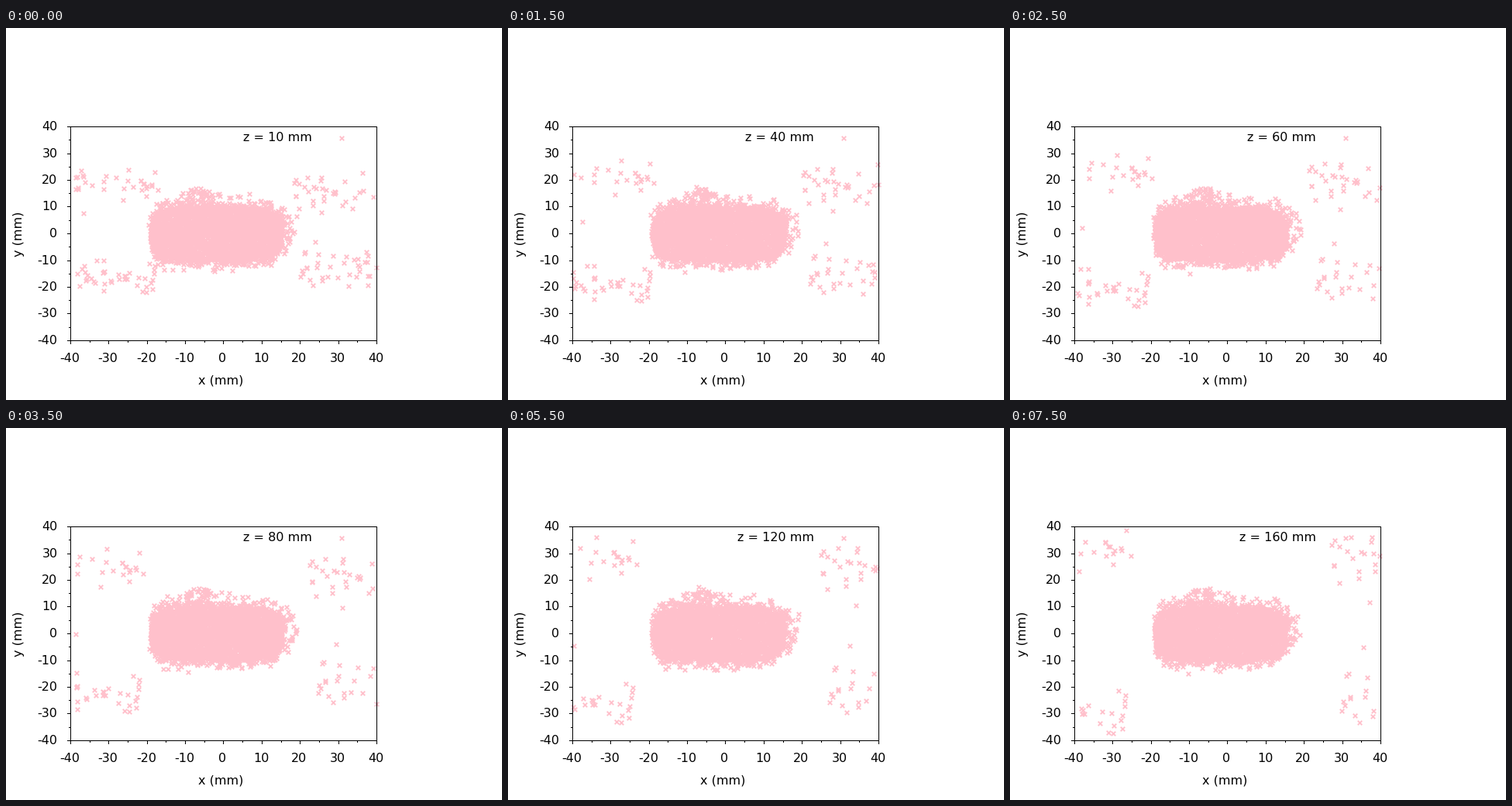
These frames come from a looping animation (640x480 px, 8000 ms). A matplotlib script:

```python
import numpy as np
import matplotlib.pyplot as plt
from matplotlib.animation import FuncAnimation

W, H, DPI = 640, 480, 100
PX = 72 / DPI
LEFT, RIGHT, TOP, BOTTOM = 83, 478, 127, 403
SX, SY = (RIGHT - LEFT) / 80, (BOTTOM - TOP) / 80
PINK = "#ffc0cb"
FRAMES, STEP = 16, 500

plt.rcParams["font.family"] = "DejaVu Sans"
plt.rcParams["font.size"] = 16 * PX

fig = plt.figure(figsize=(W / DPI, H / DPI), dpi=DPI, facecolor="white")
ax = fig.add_axes([0, 0, 1, 1])
ax.set_xlim(0, W)
ax.set_ylim(H, 0)
ax.axis("off")


def line(xs, ys):
    ax.plot(xs, ys, color="black", lw=PX, zorder=5, solid_capstyle="projecting")


def label(x, y, text, ha="center", **kw):
    return ax.text(x, y, text, ha=ha, va="baseline", zorder=6, **kw)


def crosses(x, y):
    return ax.scatter(x, y, marker="x", color=PINK, s=(5.5 * PX) ** 2,
                      linewidths=1.9 * PX, zorder=2)


def to_px(mm):
    return mm * (SX, -SY) + ((LEFT + RIGHT + 1) / 2, (TOP + BOTTOM + 1) / 2)


def draw_frame():
    line([LEFT, RIGHT, RIGHT, LEFT, LEFT], [TOP, TOP, BOTTOM, BOTTOM, TOP])
    for v in range(-40, 41, 5):
        x = round(LEFT + (v + 40) * SX)
        y = round(BOTTOM - (v + 40) * SY)
        major = v % 10 == 0
        size = 4 if major else 2
        line([x, x], [BOTTOM, BOTTOM + size])
        line([LEFT - size, LEFT], [y, y])
        if major:
            label(x - 1, 431, str(v))
            label(66.5, y + 5, str(v), ha="right")
    label(277.6, 459, "x (mm)")
    label(21, 265.5, "y (mm)", rotation=90, rotation_mode="anchor")


def make_jet(rng, count, x_near, x_far, y_mean, y_spread):
    """Escaping particles of one corner, in mm at z = 80."""
    x = x_near + (x_far - x_near) * rng.random(count) ** 1.2
    y = y_mean + y_spread * np.clip(rng.normal(size=count), -2, 2)
    return np.column_stack([x, y])


def make_beam(rng):
    """Rows of x, y and sway in mm: a full core with a ragged rim."""
    a, b = 17, 9.9

    def edge(x):
        return b * (1 - np.clip(np.abs(x / a), 0, 1) ** 4) ** 0.25

    def part(x, y, sway):
        return np.column_stack([x - 2, y, np.full(x.size, sway)])

    x = rng.uniform(-a, a, 3000)
    core = part(x, edge(x) * rng.uniform(-1, 1, x.size), 0.4)

    x = rng.uniform(-a, a, 260)
    rim = edge(x) * (1 + np.minimum(rng.exponential(0.13, x.size), 0.45))
    halo = part(x, rim * rng.choice([-1, 1], x.size), 0.8)

    x = rng.normal(-4.5, 3, 55)
    bump = part(x, rng.uniform(9, 17.5 - np.abs(x + 4) * 0.4), 0.8)

    x = a - 0.5 + np.minimum(rng.exponential(1.6, 60), 4)
    side = part(x, rng.uniform(-7, 9.5, x.size), 0.6)
    return np.vstack([core, halo, bump, side])


rng = np.random.default_rng(12)
jets = np.vstack([make_jet(rng, 31, -21, -49, 24.5, 3.6),
                  make_jet(rng, 40, -21, -48, -22.5, 4),
                  make_jet(rng, 32, 22.5, 48, 22, 4),
                  make_jet(rng, 36, 24.5, 49, -18.5, 4)])
# Drift in mm per mm of z grows with the distance from the axis
jet_drift = jets * 0.0026 + np.sign(jets) * (0, 0.027)

strays = np.array([(-38.6, 0), (29.3, -4), (31, 9.6)])
stray_drift = np.array([(-0.027, -0.11), (0.077, -0.012), (0.077, 0.025)])

beam = make_beam(rng)
phase = rng.uniform(0, 2 * np.pi, (len(beam), 2))
rate = rng.uniform(0.03, 0.09, (len(beam), 2))


def particles(z):
    sway = beam[:, 2:] * np.sin(phase + rate * z)
    mm = np.vstack([beam[:, :2] + sway,
                    jets + jet_drift * (z - 80),
                    strays + stray_drift * (z - 80)])
    return to_px(mm[np.all(np.abs(mm) <= 40, axis=1)])


draw_frame()
crosses([432.5], [141.5])
cloud = crosses([], [])
title = label(395.2, 146, "", ha="right")


def update(i):
    z = 10 * (i + 1)
    cloud.set_offsets(particles(z))
    title.set_text(f"z = {z} mm")
    return cloud, title


anim = FuncAnimation(fig, update, frames=FRAMES, interval=STEP,
                     repeat=True, repeat_delay=0, blit=False)
plt.show()
```
